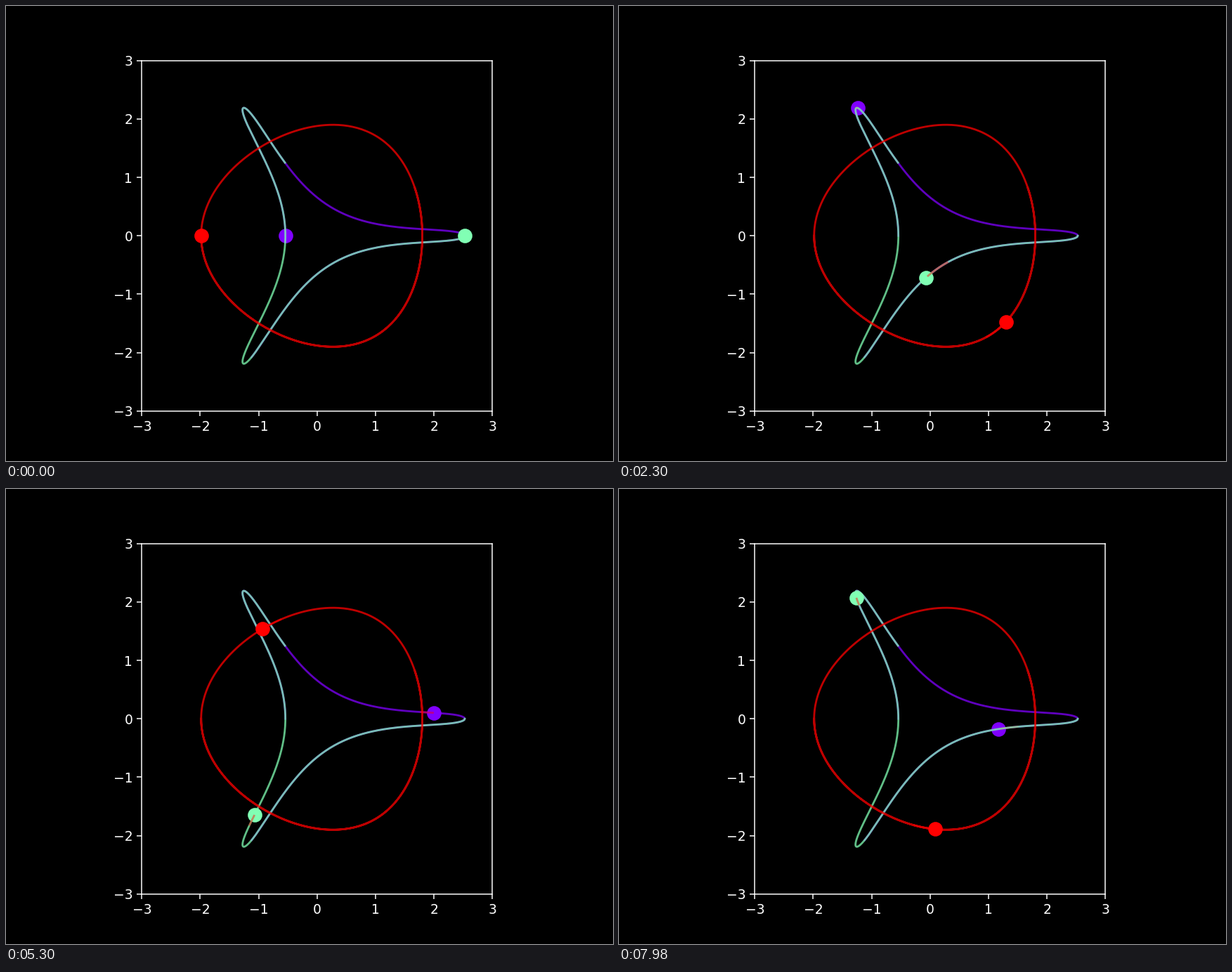
Recreate the animation shown at these times as a matplotlib script. Size 864x648 px, loop 8 s.

```python
import numpy as np
import matplotlib.pyplot as plt
from matplotlib.animation import FuncAnimation

FRAMES = 400        # frames in one loop
SAMPLES = 500       # points of the drawn orbits
DT = 0.051482       # simulated time per frame
SUBSTEPS = 20
TRAIL = 10

# Broucke A10 periodic orbit, three equal masses, G = 1
X0 = [-0.5426216182, 2.5274928067, -1.9848711885]
VY0 = [0.8750200467, -0.0526955841, -0.8223244626]


def deriv(state):
    """Velocities and accelerations; positions are complex numbers."""
    pos, vel = state
    gap = pos[None, :] - pos[:, None]
    dist = np.abs(gap) + np.eye(3)
    return np.array([vel, (gap / dist**3).sum(axis=1)])


def rk4(state, h):
    k1 = deriv(state)
    k2 = deriv(state + h / 2 * k1)
    k3 = deriv(state + h / 2 * k2)
    k4 = deriv(state + h * k3)
    return state + h / 6 * (k1 + 2 * k2 + 2 * k3 + k4)


def solve():
    state = np.array([X0, 1j * np.array(VY0)], dtype=complex)
    path = [state[0]]
    for _ in range(SAMPLES - 1):
        for _ in range(SUBSTEPS):
            state = rk4(state, DT / SUBSTEPS)
        path.append(state[0])
    return np.array(path).T


orbits = solve()

plt.style.use("dark_background")
fig, ax = plt.subplots(figsize=(6.4, 4.8), dpi=135)
ax.set_aspect("equal")
ax.set_xlim(-3, 3)
ax.set_ylim(-3, 3)

dots, trails = [], []
for orbit, color in zip(orbits, plt.cm.rainbow(np.linspace(0, 1, 3))):
    ax.plot(orbit.real, orbit.imag, color=color, alpha=0.75, lw=1.5)
    dots += ax.plot([], [], "o", color=color, ms=10)
    trails += ax.plot([], [], color="red", alpha=0.45, lw=1.5)


def update(i):
    for orbit, dot, trail in zip(orbits, dots, trails):
        dot.set_data([orbit[i].real], [orbit[i].imag])
        tail = orbit[max(0, i - TRAIL):i]
        trail.set_data(tail.real, tail.imag)
    return dots + trails


def init():
    return update(0)


anim = FuncAnimation(fig, update, frames=FRAMES, init_func=init,
                     interval=20, repeat=True, repeat_delay=0, blit=False)
plt.show()
```
